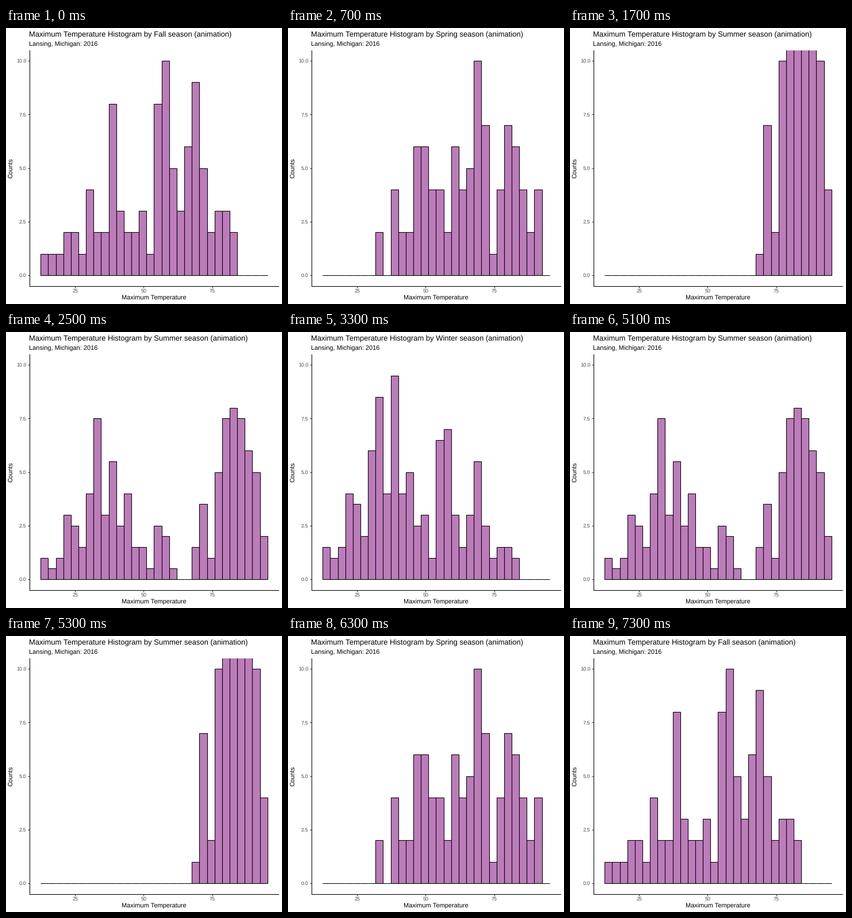
Animation of 480x480 px, one loop 8 s. Source, as a matplotlib script:

```python
import numpy as np
import matplotlib
import matplotlib.pyplot as plt
from matplotlib.animation import FuncAnimation

matplotlib.rcParams.update({
    "font.family": "Liberation Sans",
    "text.hinting": "none",
    "text.hinting_factor": 1,
})

SIZE, DPI = 480, 72          # one point equals one pixel
STEP, LOOP = 100, 8000       # ms
LEFT, RIGHT, TOP, BOTTOM = 40.5, 474.5, 38.5, 448.5
BINS = 30
LINE = 1.07


def season(start, *counts):
    """Counts per bin, beginning at bin `start`, padded with zeros."""
    bars = np.zeros(BINS)
    bars[start:start + len(counts)] = counts
    return bars


COUNTS = {
    "Fall": season(0, 1, 1, 1, 2, 2, 1, 4, 2, 2, 8, 3, 2, 2, 3, 1, 8, 10, 5,
                   3, 6, 9, 5, 2, 3, 3, 2),
    "Spring": season(7, 2, 0, 4, 2, 2, 6, 6, 4, 4, 2, 6, 4, 5, 10, 7, 1, 4, 7,
                     6, 4, 2, 4),
    "Summer": season(20, 1, 7, 2, 10, 15, 16, 15, 12, 10, 4),
    "Winter": season(0, 2, 1, 2, 6, 5, 3, 8, 15, 6, 11, 5, 8, 3, 3, 1, 5, 4,
                     1, 0, 0, 2),
}
ORDER = list(COUNTS)

# The seasons run forwards, then back. Half steps are midway to the next one.
HOLDS = [(0, 500), (0.5, 200), (1, 800), (1.5, 200), (2, 800), (2.5, 200),
         (3, 600), (3.5, 1200), (3, 600), (2.5, 200), (2, 800), (1.5, 200),
         (1, 800), (0.5, 200), (0, 700)]
ENDS = np.cumsum([ms for _, ms in HOLDS])

fig = plt.figure(figsize=(SIZE / DPI, SIZE / DPI), dpi=DPI, facecolor="white")
ax = fig.add_axes([LEFT / SIZE, 1 - BOTTOM / SIZE,
                   (RIGHT - LEFT) / SIZE, (BOTTOM - TOP) / SIZE])

# Temperature scale: 25 degrees span 119.25 px, with 25 at x = 120.2
per_px = 25 / 119.25
x_min = 25 - (120.2 - LEFT) * per_px
x_max = 25 + (RIGHT - 120.2) * per_px
pad = (x_max - x_min) / 22
edges = np.linspace(x_min + pad, x_max - pad, BINS + 1)

ax.set(xlim=(x_min, x_max), ylim=(-0.5, 10.5),
       xticks=[25, 50, 75], yticks=[0, 2.5, 5, 7.5, 10])
ax.set_xticklabels([])
ax.set_yticklabels([])
ax.tick_params(length=2.75, width=LINE, color="#333333")
ax.spines[["top", "right"]].set_visible(False)
ax.spines[["left", "bottom"]].set_linewidth(LINE)

bars = ax.bar(edges[:-1], np.zeros(BINS), np.diff(edges), align="edge",
              color="#bc7cba", edgecolor="black", linewidth=LINE, zorder=2)


def label(x, y, text, size, color="black", **kw):
    """Place text by pixel, measured from the top left corner."""
    return fig.text(x / SIZE, 1 - y / SIZE, text, fontsize=size, color=color,
                    va=kw.pop("va", "baseline"), **kw)


title = label(40, 15, "", 13.2)
label(40, 32, "Lansing, Michigan: 2016", 11)
label((LEFT + RIGHT) / 2, 473, "Maximum Temperature", 11, ha="center")
label(13.5, (TOP + BOTTOM) / 2, "Counts", 11, ha="right", va="center",
      rotation=90, rotation_mode="default")
for t in (25, 50, 75):
    label(120.2 + (t - 25) / per_px, 460, str(t), 8.8, "#4d4d4d", ha="center")
for c in (0, 2.5, 5, 7.5, 10):
    y = BOTTOM - (c + 0.5) * (BOTTOM - TOP) / 11
    label(35.5, y + 3.2, f"{c:.1f}", 8.8, "#4d4d4d", ha="right")


def draw(i):
    stage, _ = HOLDS[np.searchsorted(ENDS, i * STEP, side="right")]
    k = int(stage)
    here, after = ORDER[k], ORDER[(k + 1) % len(ORDER)]
    mix = stage - k
    heights = (1 - mix) * COUNTS[here] + mix * COUNTS[after]
    for bar, h in zip(bars, heights):
        bar.set_height(h)
    title.set_text(f"Maximum Temperature Histogram by {here} season (animation)")
    return [*bars, title]


anim = FuncAnimation(fig, draw, frames=LOOP // STEP, interval=STEP,
                     repeat=True, repeat_delay=0, blit=False)
plt.show()
```
